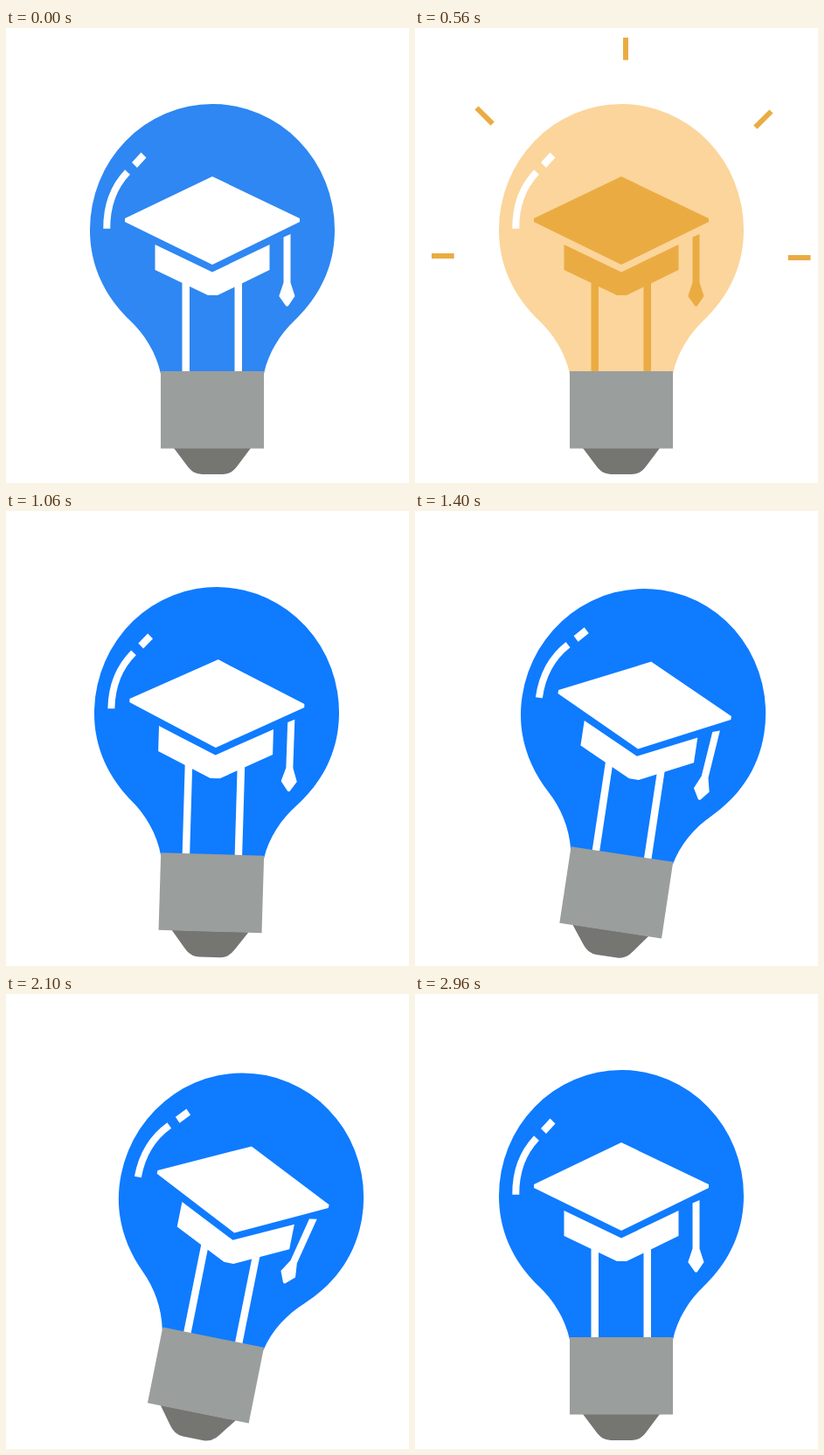
These frames come from a looping animation (461x521 px, 3 s). An HTML page:

```html
<!DOCTYPE html>
<html lang="en">
<head>
<meta charset="utf-8">
<title>Bright idea</title>
<style>
  html, body { margin: 0; width: 100%; height: 100%; overflow: hidden; background: #fff; }
  svg { display: block; width: 100vw; height: 100vh; }
</style>
</head>
<body>
<svg viewBox="0 0 461 521">
  <g id="rays" stroke="#eaac42" stroke-width="6"></g>
  <g id="lamp">
    <path id="glass" d="M177 396C172 372 158 350 142 335C115 309 96 275 96 231A140 144 0 0 1 376 231C376 275 357 309 330 335C314 350 300 372 295 396Z"/>
    <path d="M115.3 229.8C115 204 123 182 139 165" fill="none" stroke="#fff" stroke-width="8"/>
    <path d="M144 154L154.5 142.5L160.5 148.5L150 160Z" fill="#fff"/>
    <g id="wires">
      <path d="M201.5 288H210V394H201.5ZM261.5 288H270V394H261.5Z"/>
      <path id="tassel" d="M317.5 239.5L325.5 236V291.5L330.5 307L323 318Q321.5 319.5 320 318L312.3 307L317.5 291.5Z"/>
    </g>
    <path id="cap" d="M236 170L336 218V222L236 271L136 222V218ZM170.5 248L236 279.5L301.5 248V277L242 306H231L170.5 277Z"/>
    <path d="M192 481H280L265 501Q258 511 248 511H224Q214 511 207 501Z" fill="#757572"/>
    <path d="M177 393H295V481.5H177Z" fill="#9a9e9c"/>
  </g>
</svg>
<script>
const LOOP = 3000;
const BLUE = [15, 123, 255], GLOW = [251, 213, 155];
const WHITE = [255, 255, 255], GOLD = [234, 172, 66];
const RAY_LENGTH = 38;

const el = id => document.getElementById(id);
const progress = (t, from, to) => Math.min(1, Math.max(0, (t - from) / (to - from)));
const ease = (t, from, to) => (1 - Math.cos(Math.PI * progress(t, from, to))) / 2;
const pulse = (t, start, peak, end) => t < peak ? ease(t, start, peak) : 1 - ease(t, peak, end);
const mix = (a, b, k) => `rgb(${a.map((v, i) => Math.round(v + (b[i] - v) * k))})`;

// Each ray: outer tip and the direction pointing away from the lamp.
const D = Math.SQRT1_2;
const rays = [
  [241, 11, 0, -1],
  [70.5, 91.5, -D, -D],
  [407.5, 95.5, D, -D],
  [19, 261, -1, 0],
  [452.5, 263, 1, 0]
].map(([x, y, dx, dy]) => {
  const line = document.createElementNS("http://www.w3.org/2000/svg", "line");
  el("rays").append(line);
  return { line, x, y, dx, dy };
});

function drawRays(t) {
  const head = ease(t, 150, 400), tail = ease(t, 430, 770);
  el("rays").style.display = head > tail ? "" : "none";
  for (const { line, x, y, dx, dy } of rays) {
    [head, tail].forEach((k, i) => {
      const back = (1 - k) * RAY_LENGTH;
      line.setAttribute("x" + (i + 1), x - dx * back);
      line.setAttribute("y" + (i + 1), y - dy * back);
    });
  }
}

function draw(t) {
  const glassLight = ease(t, -40, 130) - ease(t, 625, 795);
  const wireLight = ease(t, 0, 130) - ease(t, 625, 795);
  const capLight = ease(t, 0, 130) - ease(t, 653, 823);
  el("glass").setAttribute("fill", mix(BLUE, GLOW, glassLight));
  el("wires").setAttribute("fill", mix(WHITE, GOLD, wireLight));
  el("cap").setAttribute("fill", mix(WHITE, GOLD, capLight));

  const tilt = 13.6 * pulse(t, 840, 1800, 2920);
  const swing = 13.5 * pulse(t, 960, 1980, 2960);
  el("lamp").setAttribute("transform", `rotate(${tilt} 236 399)`);
  el("tassel").setAttribute("transform", `rotate(${swing} 321.5 237)`);
  drawRays(t);
}

const start = performance.now();
function tick() {
  const t = (performance.now() - start) % LOOP;
  draw(t < 60 ? 0 : t); // opening pose is held briefly
  requestAnimationFrame(tick);
}
tick();
</script>
</body>
</html>
```
